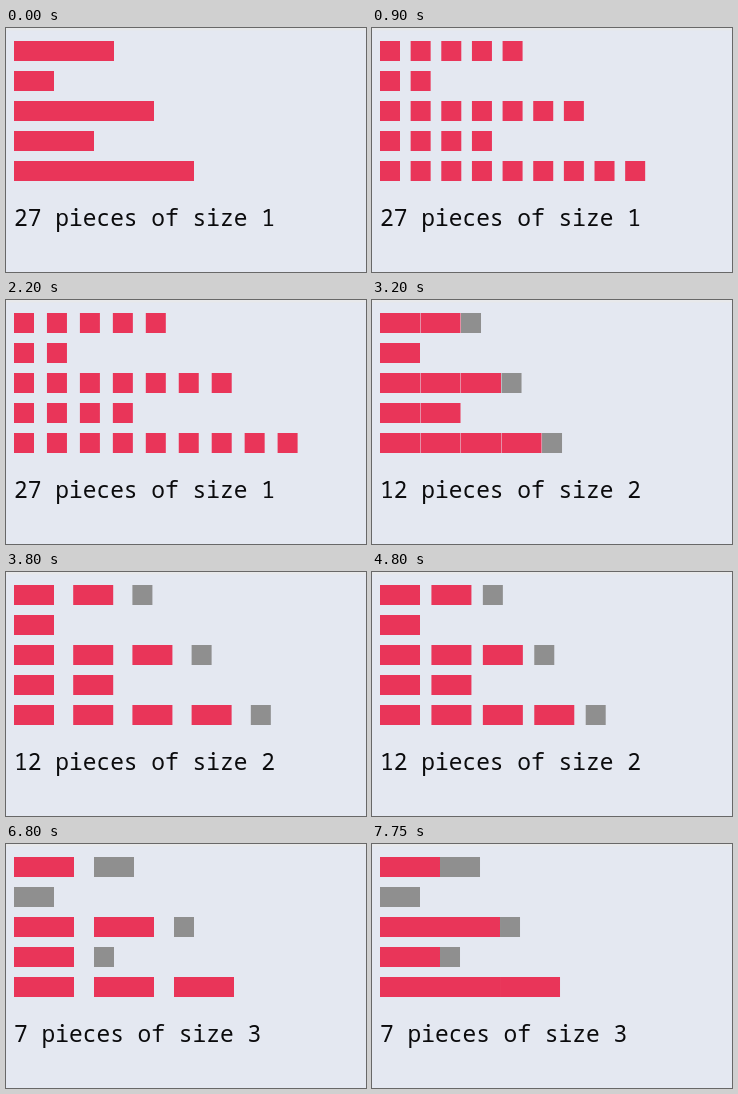
Animation of 360x244 px, one loop 8 s. Source, as an HTML page:

```html
<!DOCTYPE html>
<html lang="en">
<head>
<meta charset="utf-8">
<title>Cutting bars into pieces</title>
<style>
  html, body { margin: 0; width: 100%; height: 100%; overflow: hidden; background: #e4e8f1; }
  svg { display: block; width: 360px; height: 244px; }
  text { font: 22.9px "Noto Sans Mono", "DejaVu Sans Mono", monospace; fill: #0b0b0d; white-space: pre; }
</style>
</head>
<body>
<svg viewBox="0 0 360 244">
  <rect width="360" height="244" fill="#e4e8f1"/>
  <rect width="360" height="2.5" fill="#e8e9eb"/>
  <g id="bars"></g>
  <text id="label" x="8" y="198"></text>
</svg>
<script>
const LOOP = 8000;
const UNIT = 20;
const LEFT = 8, TOP = 13, ROW_STEP = 30;
const MAX_GAP = 20;
const MOVE = 1000;
const RED = '#e93559', GREY = '#8f8f8f';
const lengths = [5, 2, 7, 4, 9];

// Each stage cuts every bar into pieces of one size, spreads them and closes them again.
const stages = [
  { size: 1, from: 0, open: 390, close: 1756 },
  { size: 2, from: 2760, open: 3016, close: 4326 },
  { size: 3, from: 5326, open: 5417, close: 6800 }
];

const bars = document.getElementById('bars');
const label = document.getElementById('label');

const clamp = v => Math.min(1, Math.max(0, v));
const easeInOut = t => t < 0.5 ? 4 * t ** 3 : 1 - 4 * (1 - t) ** 3;
const progress = (time, start) => easeInOut(clamp((time - start) / MOVE));

function buildPieces(size) {
  const group = document.createElementNS('http://www.w3.org/2000/svg', 'g');
  const pieces = [];
  lengths.forEach((length, row) => {
    for (let i = 0; i * size < length; i++) {
      const units = Math.min(size, length - i * size);
      const node = document.createElementNS('http://www.w3.org/2000/svg', 'rect');
      node.setAttribute('y', TOP + row * ROW_STEP);
      node.setAttribute('width', units * UNIT);
      node.setAttribute('height', UNIT);
      node.setAttribute('fill', units === size ? RED : GREY);
      group.append(node);
      pieces.push({ node, index: i });
    }
  });
  bars.append(group);
  return { group, pieces };
}

for (const stage of stages) {
  Object.assign(stage, buildPieces(stage.size));
  const count = lengths.reduce((sum, n) => sum + Math.floor(n / stage.size), 0);
  stage.caption = `${count} pieces of size ${stage.size}`;
}

function render(time) {
  const current = stages.findLast(stage => time >= stage.from);
  const gap = MAX_GAP * (progress(time, current.open) - progress(time, current.close));
  for (const stage of stages) {
    stage.group.setAttribute('display', stage === current ? 'inline' : 'none');
  }
  for (const { node, index } of current.pieces) {
    // Closed pieces share whole-pixel edges, so no seam shows.
    node.setAttribute('x', LEFT + index * (current.size * UNIT + gap));
  }
  if (label.textContent !== current.caption) label.textContent = current.caption;
}

const start = performance.now();
function tick() {
  render((performance.now() - start) % LOOP);
  requestAnimationFrame(tick);
}
tick();
</script>
</body>
</html>
```
